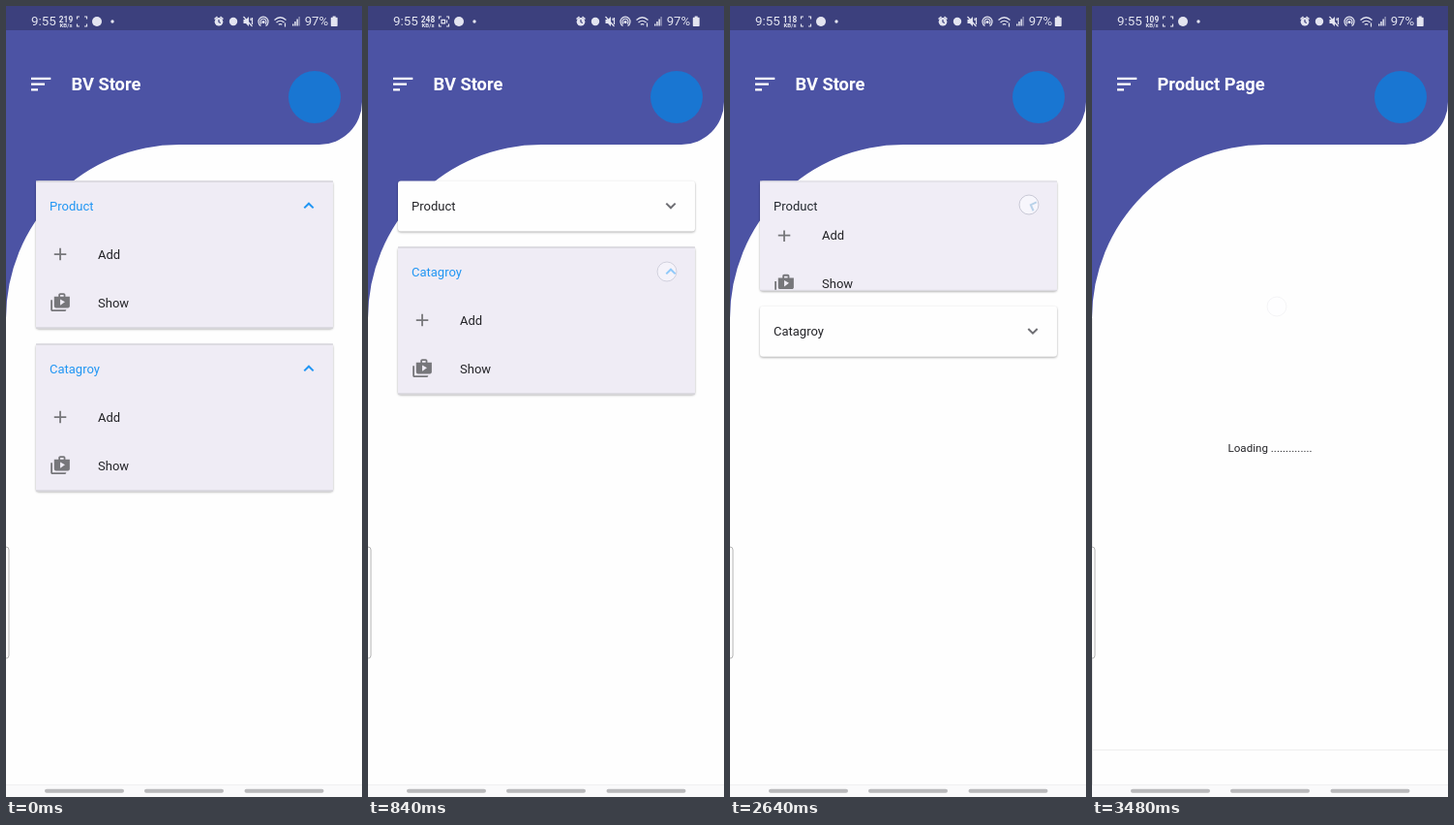
Write an HTML page that moves like this. It is 368 px wide and 816 px high and loops after 3600 ms.

```html
<!DOCTYPE html>
<html lang="en">
<head>
<meta charset="utf-8">
<title>Shop menu</title>
<style>
  html, body { margin: 0; width: 100%; height: 100%; overflow: hidden; background: #fefefe; }
  svg { display: block; font-family: Roboto, sans-serif; }
  .title { font-size: 18.3px; font-weight: 700; fill: #fff; }
  .label { font-size: 13px; fill: #242428; }
  .icon { fill: #77777b; }
  .card { fill: #fefefe; filter: drop-shadow(0 1px 1px rgba(0, 0, 0, .33)); }
  .status { fill: #e3e4f0; }
  .thin { fill: none; stroke: #e3e4f0; stroke-width: 1.2; }
</style>
</head>
<body>
<svg id="stage" width="368" height="816" viewBox="0 0 368 816">
  <defs>
    <path id="plus" d="M19 13h-6v6h-2v-6H5v-2h6V5h2v6h6z"/>
    <path id="shelf" d="M3 9H1v11c0 1.11.89 2 2 2h14c1.11 0 2-.89 2-2H3V9zm15-4V3c0-1.11-.89-2-2-2h-4c-1.11 0-2 .89-2 2v2H5v11c0 1.11.89 2 2 2h14c1.11 0 2-.89 2-2V5h-5zm-6-2h4v2h-4V3zm0 12V8l5.5 3-5.5 4z"/>
    <g id="head">
      <path fill="#fefefe" d="M0 0H368V816H0z"/>
      <path fill="#4c53a4" d="M0 0H368V99A44 44 0 0 1 324 143H179A179 179 0 0 0 0 322z"/>
      <path fill="#fff" d="M26 73.7h20.3v2.2H26zM26 79.6h14v2.2H26zM26 85.3h7v2.2H26z"/>
      <circle cx="319" cy="94" r="27" fill="#1976d2"/>
    </g>
  </defs>

  <use href="#head"/>
  <text class="title" x="67.5" y="87">BV Store</text>
  <g id="tiles"></g>

  <g id="page">
    <use href="#head"/>
    <text class="title" x="67.5" y="87">Product Page</text>
    <text x="140.5" y="459.5" font-size="11.6" fill="#242428">Loading ..............</text>
    <path d="M.5 322V804M0 767.5H368" stroke="#eee" fill="none"/>
  </g>

  <rect width="368" height="25" fill="#3c407d"/>
  <g class="status">
    <text x="26" y="20.3" font-size="13.4">9:55</text>
    <text id="speed" x="62" y="16.5" font-size="8.3" font-weight="700" text-anchor="middle"></text>
    <text x="62" y="22.3" font-size="6" font-weight="700" text-anchor="middle">KB/s</text>
    <circle cx="94" cy="16" r="5"/>
    <circle cx="110" cy="16" r="1.7"/>
    <circle cx="220" cy="16.3" r="4.3"/>
    <path d="M215 13l3-2.6 1 1.1-3 2.6zM225 13l-3-2.6-1 1.1 3 2.6z"/>
    <circle cx="235" cy="16" r="4.2"/>
    <path d="M245.500 14h2.500l3-3v10l-3-3h-2.500z"/>
    <circle cx="266" cy="16.500" r="1.6"/>
    <path d="M296 20.500h1.500v-2H296zM298.200 20.500h1.500v-4.500h-1.500zM300.400 20.500h1.500v-7h-1.500z"/>
    <path d="M302.500 20.500h1.200v-9.500h-1.200z" opacity=".6"/>
    <text x="308.700" y="20.300" font-size="13.200">97%</text>
    <path d="M337.700 10.500h3v1.300h1.300q.7 0 .7.700v7.800q0 .7-.7.700h-5.500q-.7 0-.7-.700v-7.800q0-.7.7-.700h1.200z"/>
  </g>
  <g class="thin">
    <path d="M73.500 13.500v-2.500h2.500M81 11h2.500v2.500M83.500 18.500v2.500H81M76 21h-2.500v-2.500"/>
    <path id="camera" d="M76 14.300h3.500v3.500H76zM81.500 14.500v3"/>
    <path d="M245.500 11l9 10M253 12.500v2.500M254.500 12v7"/>
    <path d="M263.500 20.500a5 5 0 1 1 5 0M264 18.500a3 3 0 1 1 4 0"/>
    <path d="M277.500 14.500q6-5.500 12 0M279.500 17q4-3.500 8 0M281.800 19.300q1.800-1.500 3.500 0M288.500 17.500v4"/>
    <path d="M220 14v2.500l1.800 1" stroke="#3c407d"/>
  </g>

  <rect x="-6" y="558" width="9" height="115" rx="3" fill="#fdfdfd" stroke="#b4b4b4"/>
  <path fill="#fafafb" d="M0 803.500H368V816H0z"/>
  <path stroke="#f0f0f1" d="M0 803.500H368"/>
  <path stroke="#b9b9bb" stroke-width="4" stroke-linecap="round" d="M42 809.700h78M145 809.700h78M248.500 809.700h78"/>
  <circle id="touch" r="10" fill="#fafaff" fill-opacity=".65" stroke="#c9c9d6"/>
</svg>

<script>
const LOOP = 3600, TOP = 180.5, CLOSED = 52, CONTENT = 100, GAP = 16;
const $ = id => document.getElementById(id);
const ramp = (t, start, length) => Math.min(1, Math.max(0, (t - start) / length));
const easeIn = k => k ** 1.7;
const easeOut = k => 1 - (1 - k) ** 1.7;
const mix = (a, b, k) => `rgb(${a.map((v, i) => Math.round(v + (b[i] - v) * k))})`;
const BLACK = [36, 36, 40], GREY = [110, 110, 115], BLUE = [33, 150, 243];

const row = (icon, name, y) => `
  <use class="icon" href="#${icon}" transform="translate(14.300 ${y - 10.700}) scale(.895)"/>
  <text class="label" x="64" y="${y + 4.500}">${name}</text>`;

function makeTile(name) {
  const g = document.createElementNS('http://www.w3.org/2000/svg', 'g');
  g.innerHTML = `
    <rect class="card" width="307" rx="3"/>
    <rect class="tint" width="307" fill="#efecf5"/>
    <path class="edge" stroke="#c9c9ce"/>
    <text class="label name" x="14" y="30">${name}</text>
    <path class="arrow" fill="none" stroke-width="2" d="M-4.700 -2.400L0 2.300L4.700 -2.400"/>
    <svg class="body" y="51" width="307" overflow="hidden"><g>
      ${row('plus', 'Add', 24.500)}${row('shelf', 'Show', 74.500)}
    </g></svg>`;
  $('tiles').append(g);
  const part = c => g.querySelector('.' + c);

  // Draws the tile and returns its height
  return (y, open, text) => {
    const k = easeIn(open), shown = CONTENT * k, h = CLOSED + shown;
    g.setAttribute('transform', `translate(31 ${y})`);
    part('card').setAttribute('height', h);
    part('tint').setAttribute('height', h);
    part('tint').setAttribute('opacity', easeOut(open));
    part('edge').setAttribute('d', `M0 .5H307M0 ${h - .5}H307`);
    part('edge').setAttribute('opacity', k);
    part('name').style.fill = mix(BLACK, BLUE, text);
    part('arrow').setAttribute('transform', `translate(282 25.500) rotate(${180 * k})`);
    part('arrow').setAttribute('stroke', mix(GREY, BLUE, k));
    part('body').setAttribute('height', shown);
    part('body').style.display = shown ? '' : 'none';
    part('body').firstElementChild.setAttribute('transform', `translate(0 ${(shown - CONTENT) / 2})`);
    return h;
  };
}

const product = makeTile('Product'), category = makeTile('Catagroy');
const speeds = [[0, 219], [470, 248], [1670, 77], [2270, 118], [2870, 77], [3470, 109]];
const touches = [[110, 250, 309, 205], [710, 820, 309, 274], [2500, 2660, 309, 205], [3110, 3400, 191, 310]];

function draw(t) {
  const h = product(TOP,
    1 - ramp(t, 340, 120) + ramp(t, 2551, 120),
    1 - ramp(t, 400, 150) + ramp(t, 2635, 150));
  category(TOP + h + GAP, 1 - ramp(t, 849, 120), 1 - ramp(t, 909, 150));

  const p = ramp(t, 3320, 120), s = .9 + .1 * p;
  $('page').setAttribute('opacity', p);
  $('page').setAttribute('transform', `translate(${184 * (1 - s)} ${408 * (1 - s)}) scale(${s})`);

  $('speed').textContent = speeds.filter(([at]) => at <= t).pop()[1];
  const blink = t % 1200;
  $('camera').setAttribute('opacity', blink > 540 && blink < 1020 ? 1 : 0);

  const [from, to, x, y] = touches.filter(([at]) => at <= t).pop() || [0, -LOOP, 0, 0];
  $('touch').setAttribute('cx', x);
  $('touch').setAttribute('cy', y);
  $('touch').setAttribute('opacity', ramp(t, from, 10) * (1 - ramp(t, to, 100)));
}

const begin = performance.now();
function tick() {
  draw((performance.now() - begin) % LOOP);
  requestAnimationFrame(tick);
}
tick();
</script>
</body>
</html>
```
